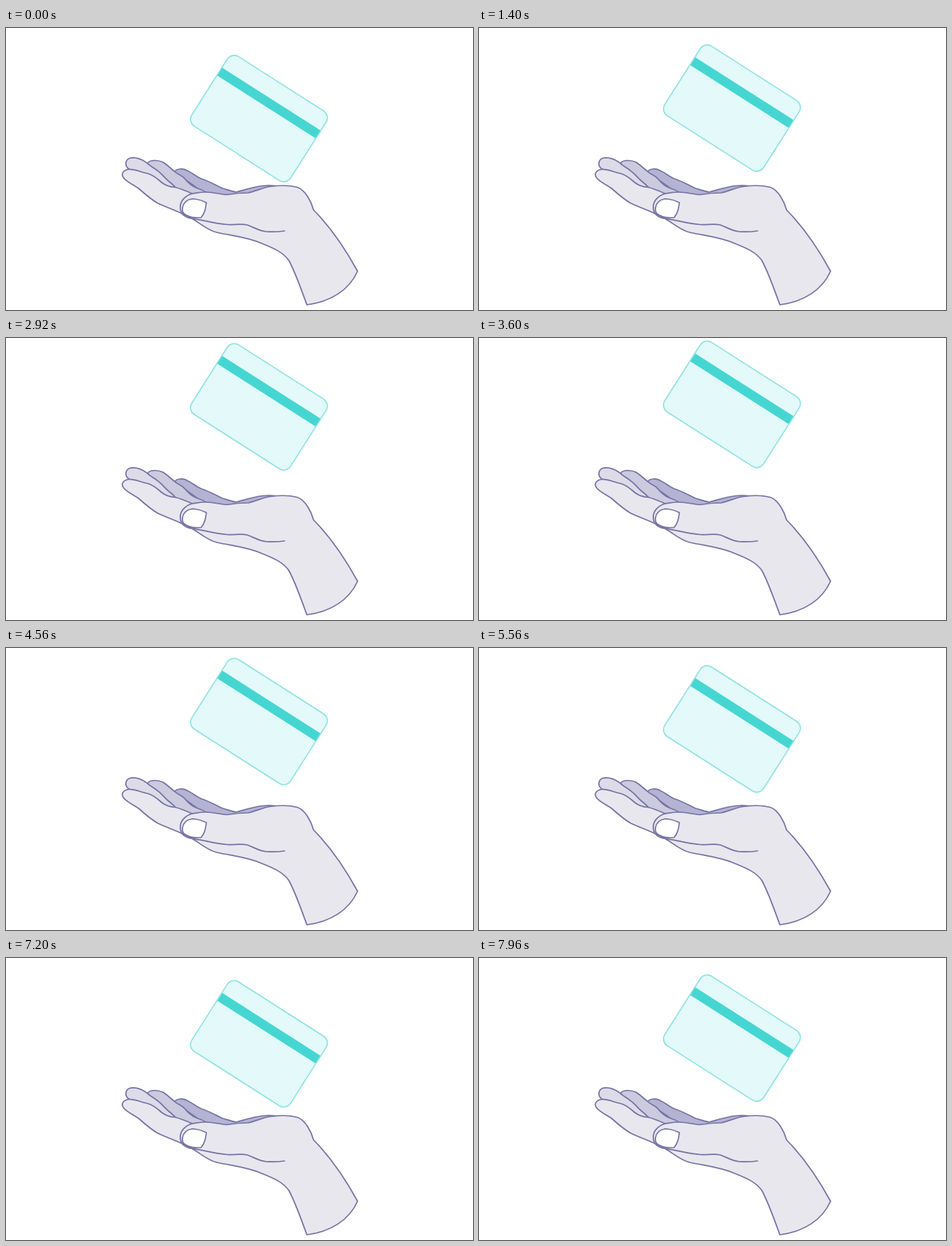
An HTML page for the animation above (8 s loop, 627x378 px).

```html
<!DOCTYPE html>
<html lang="en">
<head>
<meta charset="utf-8">
<title>Card floating over a hand</title>
<style>
  html, body { margin: 0; width: 100%; height: 100%; overflow: hidden; background: #fff; }
  svg { display: block; width: 100vw; height: 100vh; }
  .hand { stroke: #7673a4; stroke-width: 1.7; stroke-linejoin: round; stroke-linecap: round; }
</style>
</head>
<body>
<svg viewBox="0 0 627 378">
  <g class="hand">
    <!-- fingers, farthest first -->
    <path fill="#b5b3d3" d="M226 193C229 188 238 188 243 191C250 194 255 199 262 202C272 205 282 211 291 215C298 217 303 219 309 220C320 217 331 213 345 211.500C350 211 356 211 362 211.500L330 224L270 224Z"/>
    <path fill="#cccade" d="M190 181C194 176 205 177 211 180C217 184 221 188 226 192C231 197 236 197 240 202C245 208 249 212 256 214.500C262 216 267 219 270 221L250 226L210 205Z"/>
    <path fill="#dddbe8" d="M165 189C159 185 160 177 166 174.500C174 172.500 182 176 188 180C193 185 198 187 203 191C209 195 213 201 218 205C222 208 225 211 228 214L222 222L180 200Z"/>
    <!-- front finger, palm and wrist -->
    <path fill="#e8e7ee" d="M250 222C241 218 234 215 227 213.500C219 213 214 211 209 207C203 202 198 197 190 195C180 193 172 188.500 164 189.500C157 191 154 196 158 201C163 207 171 210 178 215C187 223 195 230 204 235C219 242 235 247 249 255C260 261 270 271 283 274C306 279 324 280 344 289C359 295 373 301 380 312C390 331 396 350 404 371C436 367 461 351 472 326C455 295 436 267 413 244C410 233 402 217 391 213.500C380 210.500 366 211 355 212.500C344 214 335 219 325 221C315 221 306 222 296 223.500C288 223 279 220 268 220C261 220 256 221 250 222Z"/>
    <!-- thumb -->
    <path fill="none" d="M250 222C240 225 234 232 234 240C234 248 239 253 247 255C264 257 280 262 297 263.500C307 264 316 262 324 264C333 267 339 272 350 273C359 273.500 367 273 374 272"/>
    <path fill="#fff" d="M237 241C238 234 243 230 250 229C256 229 263 231 269 234C268 242 267 248 262 254C253 255 244 253 239 249C237 247 236.500 244 237 241Z"/>
  </g>
  <g id="card">
    <rect x="-78.700" y="-55.300" width="157.400" height="110.600" rx="11" fill="#e3f9fa"/>
    <rect x="-78.700" y="-31" width="157.400" height="12.400" fill="#46d6d2"/>
    <rect x="-78.700" y="-55.300" width="157.400" height="110.600" rx="11" fill="none" stroke="#8fe3e0" stroke-width="1.600"/>
  </g>
</svg>
<script>
  const LOOP = 8000, TOP_TIME = 3425, LOW_TIME = 6705, SPEED = 0.01;
  const card = document.getElementById('card');

  // The card rises, sinks and rises again at one constant speed.
  function lift(t) {
    if (t < TOP_TIME) return SPEED * t;
    if (t < LOW_TIME) return SPEED * (2 * TOP_TIME - t);
    return SPEED * (2 * TOP_TIME - 2 * LOW_TIME + t);
  }

  const start = performance.now();
  function draw() {
    const t = (performance.now() - start) % LOOP;
    card.setAttribute('transform', `translate(339.6 ${121.4 - lift(t)}) rotate(32.5)`);
    requestAnimationFrame(draw);
  }
  draw();
</script>
</body>
</html>
```
